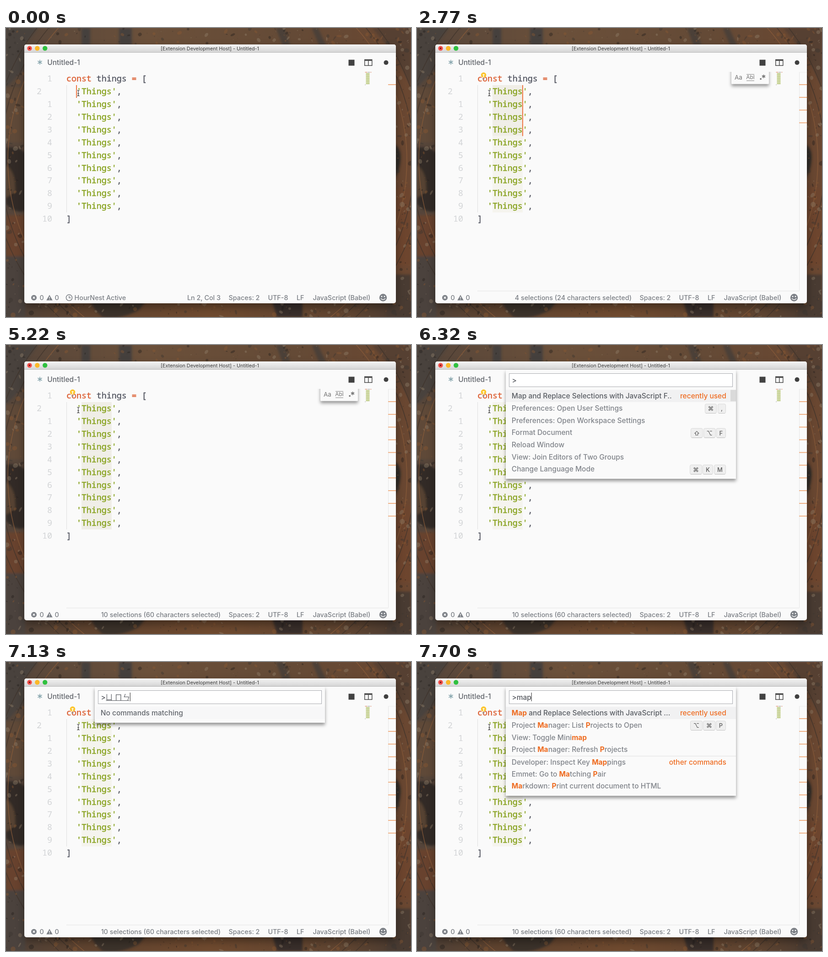
Write an HTML page that moves like this. It is 885 px wide and 633 px high and loops after 8000 ms.

```html
<!DOCTYPE html>
<html lang="en">
<head>
<meta charset="utf-8">
<title>Multi-cursor editing</title>
<style>
html, body { margin: 0; width: 100%; height: 100%; overflow: hidden; background: #5d4430; }
svg { display: block; width: 885px; height: 633px; }
text { font-family: Inter, Roboto, sans-serif; font-size: 15.5px; font-weight: 500; white-space: pre; }
.mono { font-family: "Noto Sans Mono", "DejaVu Sans Mono", monospace; font-size: 18.3px; font-weight: 400; }
.status { font-size: 14.35px; fill: #7b7f85; }
.num { fill: #d2d4d6; }
.plain { fill: #575a65; stroke: #575a65; stroke-width: .45px; }
.kw { fill: #dc5f33; stroke: #dc5f33; }
.str { fill: #86a11c; stroke: #86a11c; }
.hit { fill: #ee6b20; }
.bold { font-weight: 700; }
</style>
</head>
<body>
<svg viewBox="0 0 885 633" xmlns="http://www.w3.org/2000/svg">
  <defs>
    <linearGradient id="rust" x1="0" y1="0" x2="1" y2="0">
      <stop offset="0" stop-color="#55453a"/><stop offset=".35" stop-color="#6b503a"/>
      <stop offset=".7" stop-color="#644a36"/><stop offset="1" stop-color="#6a4731"/>
    </linearGradient>
    <linearGradient id="floor" x1="0" y1="0" x2="1" y2="0">
      <stop offset="0" stop-color="#4e4239"/><stop offset=".2" stop-color="#5f432f"/>
      <stop offset=".5" stop-color="#6f4a2f"/><stop offset=".85" stop-color="#5e4431"/>
      <stop offset="1" stop-color="#463931"/>
    </linearGradient>
    <linearGradient id="bar" x1="0" y1="0" x2="0" y2="1">
      <stop offset="0" stop-color="#f4f4f4"/><stop offset="1" stop-color="#d3d3d3"/>
    </linearGradient>
    <filter id="soft" x="-20%" y="-20%" width="140%" height="140%"><feGaussianBlur stdDeviation="2.5"/></filter>
    <filter id="lift" x="-10%" y="-10%" width="120%" height="130%">
      <feDropShadow dx="0" dy="8" stdDeviation="9" flood-color="#000" flood-opacity=".38"/>
    </filter>
    <filter id="drop" x="-10%" y="-10%" width="120%" height="140%">
      <feDropShadow dx="0" dy="5" stdDeviation="3.5" flood-color="#000" flood-opacity=".4"/>
    </filter>
    <clipPath id="body"><path d="M40 54H852V599q0 4-4 4H44q-4 0-4-4Z"/></clipPath>
    <clipPath id="under"><rect x="660" y="96" width="140" height="50"/></clipPath>
  </defs>

  <g id="photo">
    <rect width="885" height="633" fill="url(#rust)"/>
    <rect y="598" width="885" height="35" fill="url(#floor)"/>
    <g filter="url(#soft)">
      <path d="M0 0H70L40 40V90L0 130Z" fill="#4a433d"/>
      <path d="M0 130H40V250H0Z" fill="#5f4a39"/>
      <path d="M0 262Q30 258 42 275V400Q20 408 0 385Z" fill="#302a27"/>
      <path d="M0 300Q22 315 20 360L0 372Z" fill="#574233"/>
      <path d="M0 410H42V500H0Z" fill="#67432f"/>
      <path d="M0 500H42V633H0Z" fill="#4b423c"/>
      <path d="M165 0h19v38h-19ZM247 0h28v38h-28Z" fill="#45413d"/>
      <path d="M590 0h18l14 38h-18ZM668 0h14l18 38h-16Z" fill="#4c4038"/>
      <path d="M800 0H885V130L850 60Z" fill="#564132"/>
      <path d="M850 255q14 10 12 34t-12 40Z" fill="#2f2926"/>
      <path d="M850 350H885V520H850Z" fill="#6d452d"/>
      <path d="M850 540H885V633H830Z" fill="#483b33"/>
      <path d="M185 600H305L290 618Q250 640 210 633L195 618Z" fill="#3a302b"/>
      <path d="M582 600h66v33h-56Z" fill="#392f2a"/>
    </g>
    <g fill="none" stroke="#3f332b" stroke-width="1.6" opacity=".75">
      <circle cx="440" cy="290" r="472"/><circle cx="440" cy="290" r="452"/>
      <circle cx="440" cy="290" r="436" stroke="#8a5c3a"/>
    </g>
    <g id="wear" opacity=".4"></g>
  </g>

  <rect x="40" y="36" width="812" height="567" rx="5" fill="#fafafa" filter="url(#lift)"/>
  <path d="M40 54V41q0-5 5-5H847q5 0 5 5V54Z" fill="url(#bar)"/>
  <path d="M40 53.5H852" stroke="#b9b9b9"/>
  <circle cx="51.5" cy="44.5" r="5.2" fill="#f4514c"/><circle cx="51.5" cy="44.5" r="1.7" fill="#721310"/>
  <circle cx="68.3" cy="44.5" r="5.2" fill="#fbb829"/><circle cx="85.2" cy="44.5" r="5.2" fill="#2fc13f"/>
  <text x="445.5" y="48.6" text-anchor="middle" fill="#3c3c3c" style="font-size:10.8px;font-weight:400">[Extension Development Host] - Untitled-1</text>

  <path d="M74 69.8v10.4M69.4 72.3l9.2 5.4M78.6 72.3l-9.2 5.4" stroke="#86a5ad" stroke-width="1.6"/>
  <text x="90.3" y="80.8" fill="#62666c">Untitled-1</text>
  <rect x="748.5" y="69.5" width="13" height="13" fill="#424242"/>
  <path d="M783 68.5H800.5V83H783ZM784.5 72V81.5H791V72ZM792.5 72V81.5H799V72Z" fill="#4d4d4d" fill-rule="evenodd"/>
  <circle cx="830.5" cy="75.7" r="5" fill="#3f3f3f"/>

  <g clip-path="url(#body)">
    <g id="back"></g>
    <g id="code"></g>
    <g id="front"></g>
  </g>

  <g fill="none" stroke="#7b7f85" stroke-width="1.5">
    <circle cx="61" cy="590.7" r="6" fill="#7b7f85" stroke="none"/>
    <path d="M58.8 588.5l4.4 4.4m0-4.4l-4.4 4.4" stroke="#fff"/>
    <path d="M95 584.5l6.7 12H88.3Z" fill="#7b7f85" stroke="none"/>
    <path d="M95 588.5v4m0 1.3v1.4" stroke="#fff"/>
    <circle cx="824" cy="590.5" r="8.2" fill="#7b7f85" stroke="none"/>
    <circle cx="821" cy="588" r="1.5" fill="#fff" stroke="none"/><circle cx="827" cy="588" r="1.5" fill="#fff" stroke="none"/>
    <path d="M819 592.3q5 5.5 10 0" stroke="#fff"/>
  </g>
  <text class="status" x="73.5" y="596">0</text><text class="status" x="106.5" y="596">0</text>
  <text class="status" x="486.6" y="596">Spaces: 2</text><text class="status" x="572.4" y="596">UTF-8</text>
  <text class="status" x="635" y="596">LF</text><text class="status" x="670.4" y="596">JavaScript (Babel)</text>
  <g id="status"></g>
  <g id="palette"></g>
  <g fill="none" stroke-linecap="round">
    <path id="beam" d="M155.6 136.2q2.4 0 2.4 2v8.6q0 2-2.4 2M160.4 136.2q-2.4 0-2.4 2v8.6q0 2 2.4 2M156.5 143.8h3" stroke="#fff" stroke-width="2.6"/>
    <path d="M155.6 136.2q2.4 0 2.4 2v8.6q0 2-2.4 2M160.4 136.2q-2.4 0-2.4 2v8.6q0 2 2.4 2M156.5 143.8h3" stroke="#333" stroke-width="1.1"/>
  </g>
</svg>

<script>
const LOOP = 8000, LINE = 27.9, COL = 10.98, LEFT = 132;
const $ = id => document.getElementById(id);
const lineTop = i => 97.2 + LINE * i;
const each = (n, fn) => Array.from({ length: n }, (_, i) => fn(i)).join('');
const rect = (x, y, w, h, fill, more = '') =>
  `<rect x="${x}" y="${y}" width="${w}" height="${h}" fill="${fill}" ${more}/>`;
const text = (x, y, s, attrs = '') => `<text x="${x}" y="${y}" ${attrs}>${s}</text>`;
const span = (cls, s) => `<tspan class="${cls}">${s}</tspan>`;

const pen = document.createElement('canvas').getContext('2d');
const widthOf = s => {
  pen.font = '500 15.5px Inter, Roboto, sans-serif';
  return pen.measureText(s).width;
};

// Times at which each further selection is added, from the first one on
const selectAt = [750, 2300, 2530, 2770, 2980, 3190, 3460, 3780, 3990, 4370];
const typed = [
  [5520, '', 'recent'], [6440, 'ㄩ', 'none'], [6575, 'ㄩㄇ', 'none'], [6710, 'ㄩㄇㄣ', 'none'],
  [7310, '', 'recent'], [7490, 'm', 'match'], [7595, 'ma', 'match'], [7700, 'map', 'match']
];
const zhuyinX = [217.4, 238, 255.2], zhuyinEnd = [233, 253, 271];

const recent = [
  ['Map and Replace Selections with JavaScript F..'],
  ['Preferences: Open User Settings', [['⌘', 629, 26], [',', 657, 18]]],
  ['Preferences: Open Workspace Settings'],
  ['Format Document', [['⇧', 598, 26.5], ['⌥', 626, 26.5], ['F', 653.5, 21.5]]],
  ['Reload Window'],
  ['View: Join Editors of Two Groups'],
  ['Change Language Mode', [['⌘', 596, 27], ['K', 624, 23], ['M', 649, 26]]]
];
const match = [
  ['[Map] and Replace Selections with JavaScript ...'],
  ['Project [Ma]nager: List [P]rojects to Open', [['⌥', 597, 27], ['⌘', 625, 27], ['P', 653, 22]]],
  ['View: Toggle Mini[map]'],
  ['Project [Ma]nager: Refresh [P]rojects'],
  ['Developer: Inspect Key [Map]pings'],
  ['Emmet: Go to [Ma]tching [P]air'],
  ['[Ma]rkdown: [P]rint current document to HTML']
];

// Fades in four even steps
function fade(t, from, to) {
  if (t < from) return 0;
  return Math.min(4, Math.floor((t - from) / (to - from) * 3 + 1e-6) + 1) / 4;
}
const blink = t => t < 5050
  ? 1 - fade(t, 1420, 1590) + fade(t, 1820, 2000)
  : 1 - fade(t, 5050, 5220);

// Marks the first `left` bracketed letters as hits
function marked(s, left) {
  return s.replace(/\[(\w+)\]/g, (_, part) => {
    const hit = part.slice(0, left);
    left -= hit.length;
    return (hit && span('hit bold', hit)) + part.slice(hit.length);
  });
}

// Seeded scratches and stains on the rusty backdrop
function drawWear() {
  let seed = 7;
  const rnd = () => (seed = seed * 16807 % 2147483647) / 2147483647;
  const tones = ['#241f1c', '#3b3531', '#8d5a34', '#94826d'];
  return each(420, i => {
    const across = i % 2, side = rnd() < .5;
    const x = across ? rnd() * 885 : side ? rnd() * 40 : 852 + rnd() * 33;
    const y = across ? (side ? rnd() * 36 : 603 + rnd() * 30) : rnd() * 633;
    const size = 1 + 5 * rnd() ** 2;
    return `<ellipse cx="${x}" cy="${y}" rx="${size}" ry="${size * (.3 + rnd() * .7)}"
      fill="${tones[Math.floor(rnd() * 4)]}" transform="rotate(${rnd() * 180} ${x} ${y})"/>`;
  });
}

function keycap([label, x, w], y) {
  return rect(x + .5, y + .5, w - 1, 20.5, '#efefef', 'rx="3" stroke="#dadada"') +
    `<path d="M${x + 2} ${y + 21}h${w - 4}" stroke="#c6c6c6"/>` +
    text(x + w / 2, y + 15.6, label,
      'text-anchor="middle" fill="#5c5c5c" style="font-size:13px;font-family:Inter,\'DejaVu Sans\',sans-serif"');
}

function drawCode() {
  let out = `<path d="M132.5 125V404" stroke="#dfdfdf"/>`;
  out += each(12, i => {
    const y = lineTop(i) + 20;
    const num = i < 2 ? i + 1 : i - 1;
    const body = i === 0
      ? span('kw', 'const') + ' things ' + span('kw', '=') + ' ['
      : i === 11 ? ']' : '  ' + span('str', "'Things'") + ',';
    return (i === 1 ? text(67, y, num, 'class="mono num"')
      : text(101, y, num, 'class="mono num" text-anchor="end"')) +
      text(LEFT, y, body, 'class="mono plain" xml:space="preserve"');
  });
  out += rect(784.5, 96.3, 5, 1.2, '#e08a68') + rect(790.5, 96.3, 5, 1.2, '#a3a5aa') + rect(796.5, 96.3, 2, 1.2, '#e08a68');
  out += each(10, i => rect(786.5, 98.9 + 2.5 * i, 8, 1.5, '#b0c067'));
  return out + rect(784.5, 123.7, 1.2, 1.4, '#999');
}

function drawBack(n, picking) {
  let out = '';
  if (n) out += rect(132, 575.5, n > 1 ? 704 : 652, 1, '#e6e6e6');
  if (n > 1) out += rect(835, 97, 1, 478, '#e6e6e6') + rect(835, 96.5, 17, 1, '#ededed');
  const shown = n > 1 ? 10 : n;
  out += each(shown, i => rect(LEFT + 3 * COL, lineTop(i + 1), 6 * COL, LINE,
    picking || i >= n ? '#f5f4ee' : '#f0eee7'));
  return out + each(Math.max(1, n), i => rect(835, 123.2 + 27.85 * i, 17, 1.7, '#efa673'));
}

function drawFront(t, n, picking) {
  const alpha = picking ? 0 : blink(t);
  const col = n ? 9 : t < 480 ? 2 : 3;
  let out = each(Math.max(1, n), i =>
    rect(LEFT + col * COL - .9, lineTop(i + 1), 2, LINE, '#ee7442', `opacity="${alpha}"`));
  if (t >= 1010 && !(t >= 3990 && t < 4070)) {
    out += `<circle cx="145.5" cy="103" r="5.8" fill="#fcc52c"/>
      <path d="M143 101h5l-1.4 3v4.5h-2.2V104Z" fill="#fff6d8"/>
      <path d="M143 110.4h5M143.6 112.6h3.8" stroke="#8d8d8d" stroke-width="1.3"/>`;
  }
  if (n > 1 && t < 6320) out += finder();
  return out;
}

function finder() {
  const small = 'fill="#757575" style="font-size:13.5px;font-weight:400"';
  return `<g clip-path="url(#under)">${rect(687, 80, 82, 42.5, '#fafafa', 'rx="2" filter="url(#drop)"')}</g>` +
    text(694, 113, 'Aa', small) +
    text(728.5, 112, 'Abl', 'text-anchor="middle" fill="#757575" style="font-size:12px;font-weight:400"') +
    `<path d="M720 101.5H737M720 115.5H737" stroke="#858585"/>` +
    rect(749.5, 110, 3.2, 3.2, '#757575') +
    `<path d="M757.5 102v8M754 104l7 4M761 104l-7 4" stroke="#757575" stroke-width="1.5"/>`;
}

function drawStatus(t, n) {
  const where = n > 1 ? `${n} selections (${n * 6} characters selected)`
    : n ? 'Ln 2, Col 10 (6 selected)' : `Ln 2, Col ${t < 480 ? 3 : 4}`;
  let out = text(469, 596, where, 'class="status" text-anchor="end"');
  if (n < 2) {
    out += `<g fill="none" stroke="#7b7f85" stroke-width="1.5"><circle cx="138" cy="590.7" r="6.6"/>
      <path d="M138 586.5v4.5h3.6"/></g>` + text(149.6, 596, 'HourNest Active', 'class="status"');
  }
  return out;
}

function drawPalette(t) {
  const step = typed.filter(s => s[0] <= t).pop();
  if (!step) return '';
  const [, query, mode] = step;
  const high = mode === 'none' ? 79 : 239;
  const rowTop = i => 98.3 + 26.7 * i;
  let out = rect(194, 54, 503, high, '#fafafa', 'filter="url(#drop)"') +
    rect(201.5, 62.5, 488, 29, '#fff', 'stroke="#a9abb0"');

  let caret = 207.4 + widthOf('>' + query);
  if (mode === 'none') {
    const k = query.length;
    caret = zhuyinEnd[k - 1];
    out += text(207.4, 82.6, '&gt;', 'fill="#55585e"') +
      text(zhuyinX.slice(0, k).join(' '), 82.6, query,
        'fill="#55585e" style="font-weight:400;font-family:\'Noto Sans CJK TC\',\'Noto Sans CJK\',sans-serif"') +
      `<path d="M218.5 84.5H${caret - 2}" stroke="#55585e"/>`;
  } else {
    out += text(207.4, 82.6, '&gt;' + query, 'fill="#55585e"');
  }
  if (t < 6020 || t >= 6440) out += rect(caret - .3, 67, 1.2, 19, '#444');

  if (mode === 'none') {
    return out + rect(197, 98.3, 500, 26.7, '#f7f7f8') +
      text(206.8, 117.2, 'No commands matching', 'fill="#62666c"');
  }

  const rows = mode === 'recent' ? recent : match;
  out += rect(194, 98.3, 503, 26.7, '#f1f1f2');
  if (mode === 'recent') out += rect(685, 98.3, 12, 25, '#dadada');
  else out += rect(194, 205.6, 503, 1, '#dedede');
  rows.forEach(([label, keys = []], i) => {
    const drop = mode === 'match' && i === 4 ? 1 : 0;
    out += text(206.8, rowTop(i) + 18.9 + drop, marked(label, query.length),
      `fill="${i ? '#80848a' : '#5a5e64'}"`);
    out += keys.map(k => keycap(k, rowTop(i) + 3.6)).join('');
  });
  const tag = (i, s) => text(675.8, rowTop(i) + 18.9 + (i ? 1 : 0), s, 'class="hit" text-anchor="end"');
  out += tag(0, 'recently used');
  if (mode === 'match') out += tag(4, 'other commands');
  return out;
}

const last = {};
function put(id, html) {
  if (last[id] === html) return;
  last[id] = html;
  $(id).innerHTML = html;
}

function render(t) {
  const n = selectAt.filter(s => s <= t).length;
  const picking = t >= 5520;
  put('back', drawBack(n, picking));
  put('front', drawFront(t, n, picking));
  put('status', drawStatus(t, n));
  put('palette', drawPalette(t));
}

put('wear', drawWear());
put('code', drawCode());
const start = performance.now();
function tick() {
  render((performance.now() - start) % LOOP);
  requestAnimationFrame(tick);
}
tick();
</script>
</body>
</html>
```
